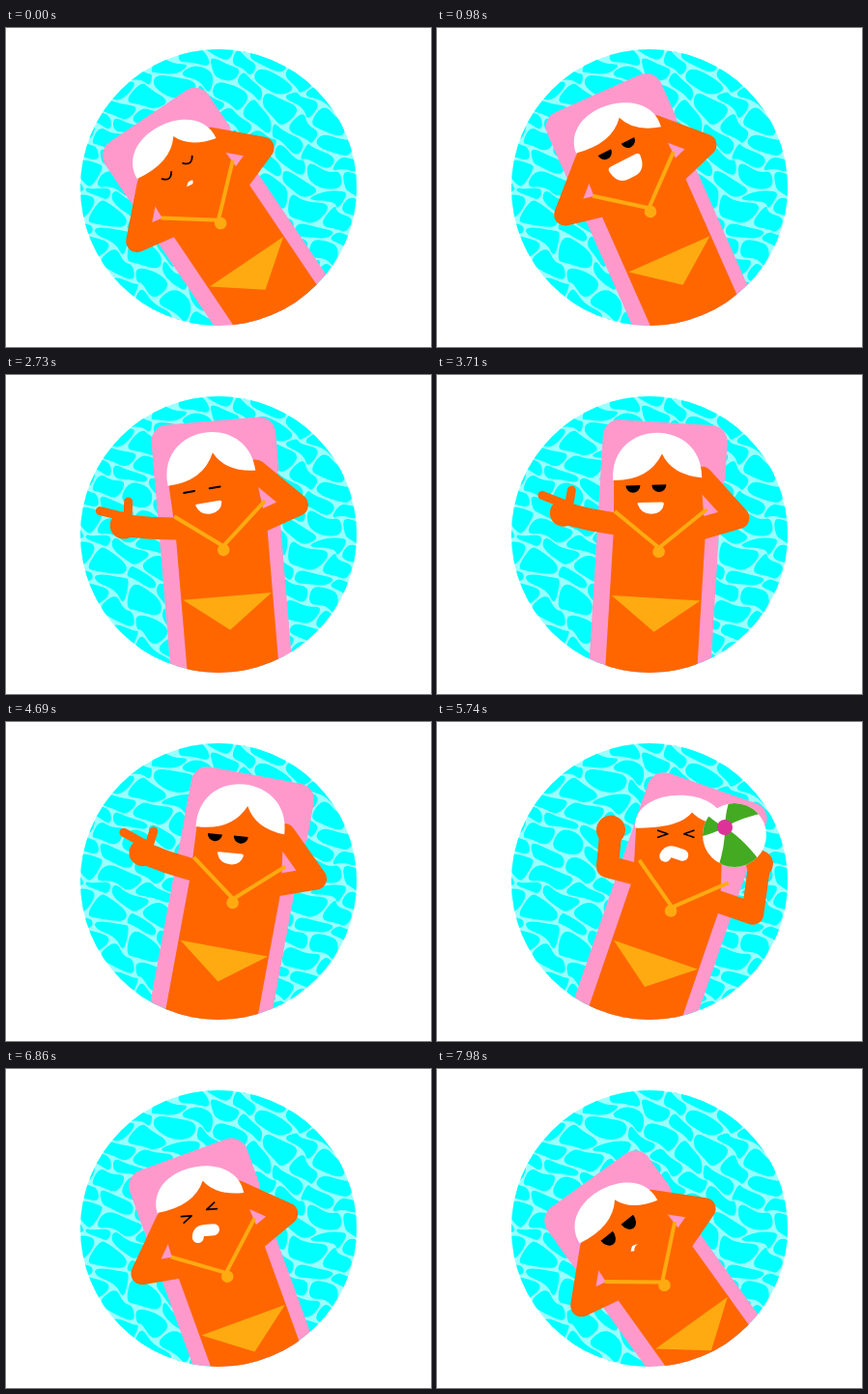
These frames come from a looping animation (440 by 330 pixels, 8 s). An HTML page with a canvas:

```html
<!DOCTYPE html>
<html lang="en">
<head>
<meta charset="utf-8">
<title>Pool float</title>
<style>
  html, body { margin: 0; width: 100%; height: 100%; overflow: hidden; background: #fff; }
  canvas { display: block; width: 440px; height: 330px; }
</style>
</head>
<body>
<canvas id="stage" width="440" height="330"></canvas>
<script>
const ctx = document.getElementById('stage').getContext('2d');
const LOOP = 8000, STEP = 70, TURN = 2520, HIT = 5740;
const RAD = Math.PI / 180, TAU = Math.PI * 2;
const SKIN = '#ff6600', PINK = '#ff99cc', GOLD = '#ffaa11', WHITE = '#fff', BLACK = '#000';

// Arms are [elbow x, elbow y, hand x, hand y, hand radius].
const REST = {
  hair: { x: 0, y: -82, tilt: 8, height: 37, partX: 7, partY: -21 },
  face: { x: -5, y: -72, tilt: -3 },
  left: [-82, -33, -40, -75, 11],
  right: [80, -40, 40, -79, 11]
};
const POINTING = {
  hair: { x: -6, y: -76, tilt: -4, height: 47, partX: 5, partY: -25 },
  face: { x: -17, y: -64, tilt: -5 },
  left: [-74, -29, -101, -34, 14],
  right: REST.right
};
const STRUCK = {
  hair: { x: -20, y: -86, tilt: -19, height: 32, partX: 13, partY: -14 },
  face: { x: -21, y: -77, tilt: -19 },
  left: [-77, -22, -86, -59, 15],
  right: [81, -25, 71, -76, 14]
};

const ramp = (t, from, to) => Math.max(0, Math.min(1, (t - from) / (to - from)));
const ease = (t, from, to) => (1 - Math.cos(Math.PI * ramp(t, from, to))) / 2;

function mix(rest, pointing, struck, p, s) {
  if (typeof rest === 'number') return rest + (pointing - rest) * p + (struck - rest) * s;
  const out = Array.isArray(rest) ? [] : {};
  for (const key in rest) out[key] = mix(rest[key], pointing[key], struck[key], p, s);
  return out;
}

// Slow turn to the right, a knock back by the ball, then a slow turn on.
function floatAt(t) {
  const turn = ramp(t, 0, HIT), knock = ramp(t, HIT, 6860), after = ramp(t, 6860, LOOP);
  const tilt = -34 + 53 * turn + 4 * Math.sin(Math.PI * turn) ** 2
    - 36 * ease(t, HIT, 6650) - 19 * ramp(t, 6650, LOOP);
  return {
    tilt,
    x: 221 + 0.0114 * (tilt + 24) ** 2 + 8 * knock + 5 * after,
    y: 181 + 0.025 * (tilt + 5) ** 2 + 28 * knock - 9 * after
  };
}

function eyesAt(t) {
  if (t < 560) return 'closed';
  if (t >= 2660 && t < 2870) return 'line';
  if (t >= HIT - STEP && t < 7280) return 'squint';
  return t < HIT ? 'half' : 'angry';
}
function mouthAt(t) {
  if (t < 700) return 'small';
  if (t < 2590) return 'grin';
  if (t < HIT - STEP) return 'smile';
  return t < 7280 ? 'wavy' : 'frown';
}

function at(x, y, deg, draw) {
  ctx.save();
  ctx.translate(x, y);
  ctx.rotate(deg * RAD);
  draw();
  ctx.restore();
}
function fill(d, color) {
  ctx.fillStyle = color;
  ctx.fill(new Path2D(d));
}
function stroke(d, color, width, cap = 'round') {
  ctx.strokeStyle = color;
  ctx.lineWidth = width;
  ctx.lineCap = cap;
  ctx.lineJoin = 'round';
  ctx.stroke(new Path2D(d));
}
function disc(x, y, r, color) {
  ctx.beginPath();
  ctx.arc(x, y, r, 0, TAU);
  ctx.fillStyle = color;
  ctx.fill();
}

function noise(i, j) {
  const n = Math.sin(i * 127.1 + j * 311.7) * 43758.5453;
  return n - Math.floor(n) - 0.5;
}
// Corner of a jittered, wavy brick lattice.
function latticePoint(i, j) {
  const x = i * 18 + noise(i, j) * 15, y = j * 19 + noise(j + 50, i) * 14;
  return [x, y + 7 * Math.sin(x / 38)];
}
function drawCell(i, j) {
  const corners = [[i, j], [i + 1, j], [i + 2, j], [i + 2, j + 1], [i + 1, j + 1], [i, j + 1]]
    .map(([a, b]) => latticePoint(a, b));
  const mid = k => corners.reduce((sum, c) => sum + c[k], 0) / 6;
  const cx = mid(0), cy = mid(1);
  const ring = corners.map(([x, y]) => [cx + (x - cx) * 0.94, cy + (y - cy) * 0.88]);
  ctx.beginPath();
  ring.forEach(([x, y], n) => {
    const [nx, ny] = ring[(n + 1) % 6], [px, py] = ring[(n + 5) % 6];
    if (!n) ctx.moveTo((px + x) / 2, (py + y) / 2);
    ctx.quadraticCurveTo(x, y, (x + nx) / 2, (y + ny) / 2);
  });
  ctx.fill();
}
function drawWater() {
  ctx.fillStyle = '#99ffff';
  ctx.fillRect(0, 0, 440, 330);
  at(220, 165, 28, () => {
    ctx.fillStyle = '#00ffff';
    for (let j = -9; j < 9; j++)
      for (let i = -10; i < 10; i += 2) drawCell(i + (j & 1), j);
  });
}

function drawArm(side, [ex, ey, hx, hy, r], finger = 0) {
  stroke(`M${side * 38} -25L${ex} ${ey}L${hx} ${hy}`, SKIN, 23);
  disc(hx, hy, r, SKIN);
  if (finger > 0.3) {
    stroke(`M${hx + 4} ${hy - 8}l${-27 * finger} ${-9 * finger}`, SKIN, 9);
    stroke(`M${hx + 5} ${hy - 6}l2 ${-18 * finger}`, SKIN, 9);
  }
}

function drawEyes(kind) {
  for (const side of [-1, 1]) at(side * 13.5, 0, 0, () => {
    if (kind === 'closed') stroke('M-6 -1Q0 7 6 -1', BLACK, 1.8);
    if (kind === 'line') stroke('M-5.5 0H5.5', BLACK, 2);
    if (kind === 'squint') stroke(`M${side * 5} -3.5L${-side * 5} 0L${side * 5} 3.5`, BLACK, 1.8);
    if (kind === 'half') fill('M-7.5 -4H7.5A7.5 7.5 0 0 1 -7.5 -4Z', BLACK);
    if (kind === 'angry') fill('M-8 -5H8A8 11 0 0 1 -8 -5Z', BLACK);
  });
}

const MOUTHS = {
  small: 'M-4 21Q0 16 5 19Q4 23 1 22Z',
  grin: 'M-14 12H14Q19 12 18 17Q16 32 3 32H-3Q-16 32 -18 17Q-19 12 -14 12Z',
  smile: 'M-8 14H16Q18 14 18 16Q16 26 5 26T-9 16Q-10 14 -8 14Z',
  frown: 'M-4 23Q1 17 6 22Q2 21 -1 25Z'
};
function drawMouth(kind) {
  if (kind === 'wavy') stroke('M-11 23Q-8 17 -2 19T7 22', WHITE, 12);
  else fill(MOUTHS[kind], WHITE);
}

function drawHair({ height, partX, partY }) {
  ctx.beginPath();
  ctx.ellipse(0, 0, 45, height - 3, 0, 0, TAU);
  ctx.fillStyle = SKIN;
  ctx.fill();
  const top = -height * 4 / 3;
  fill(`M-46 2C-49 ${top} 47 ${top} 46 0Q${partX + 10} -3 ${partX} ${partY}Q${partX - 14} 3 -46 2Z`, WHITE);
}

function drawBall(t) {
  const d = t - HIT;
  const [vx, vy, spin] = d < 0 ? [-0.3, -0.15, -0.3] : [-0.2, -0.34, -0.3];
  at(308 + vx * d, 117 + vy * d, spin * d, () => {
    disc(0, 0, 33, WHITE);
    ctx.clip();
    const p = (angle, r) => `${-10 + r * Math.cos(angle)} ${-8 + r * Math.sin(angle)}`;
    for (let n = 0; n < 3; n++) {
      const a = n * TAU / 3 - 1.3, b = a + 1;
      fill(`M-10 -8Q${p(a - 0.25, 25)} ${p(a, 60)}L${p(b, 60)}Q${p(b - 0.25, 25)} -10 -8Z`, '#44aa22');
    }
    disc(-10, -8, 8, '#dd3399');
  });
}

function drawSwimmer(t) {
  const pointing = ramp(t, TURN, TURN + 140) - ramp(t, HIT - 140, HIT);
  const struck = ramp(t, HIT - 140, HIT) - ramp(t, HIT + 280, HIT + 560);
  const { hair, face, left, right } = mix(REST, POINTING, STRUCK, pointing, struck);
  const { x, y, tilt } = floatAt(t);

  at(x, y, tilt, () => {
    ctx.fillStyle = PINK;
    ctx.fillRect(-65, -100, 126, 350);
    ctx.beginPath();
    ctx.roundRect(-65, -134, 129, 70, 17);
    ctx.fill();

    drawArm(-1, left, pointing);
    drawArm(1, right);

    const dx = 45 * Math.cos(hair.tilt * RAD), dy = 45 * Math.sin(hair.tilt * RAD);
    fill(`M${hair.x - dx} ${hair.y - dy}L-48 -20V250H47V-20L${hair.x + dx} ${hair.y + dy}Z`, SKIN);
    at(hair.x, hair.y, hair.tilt, () => drawHair(hair));
    at(face.x, face.y, face.tilt, () => {
      drawEyes(eyesAt(t));
      drawMouth(mouthAt(t));
    });

    stroke('M-48 -39L0 -4L47 -47', GOLD, 4, 'butt');
    disc(0, 0, 6.3, GOLD);
    fill('M-46 48H46L0 83Z', GOLD);
  });
}

function render(now) {
  const t = Math.floor(now % LOOP / STEP) * STEP;
  ctx.clearRect(0, 0, 440, 330);
  ctx.save();
  ctx.beginPath();
  ctx.arc(220, 165, 143, 0, TAU);
  ctx.clip();
  drawWater();
  drawSwimmer(t);
  drawBall(t);
  ctx.restore();
}

let start;
function tick(now) {
  start ??= now;
  render(now - start);
  requestAnimationFrame(tick);
}
render(0);
requestAnimationFrame(tick);
</script>
</body>
</html>
```
